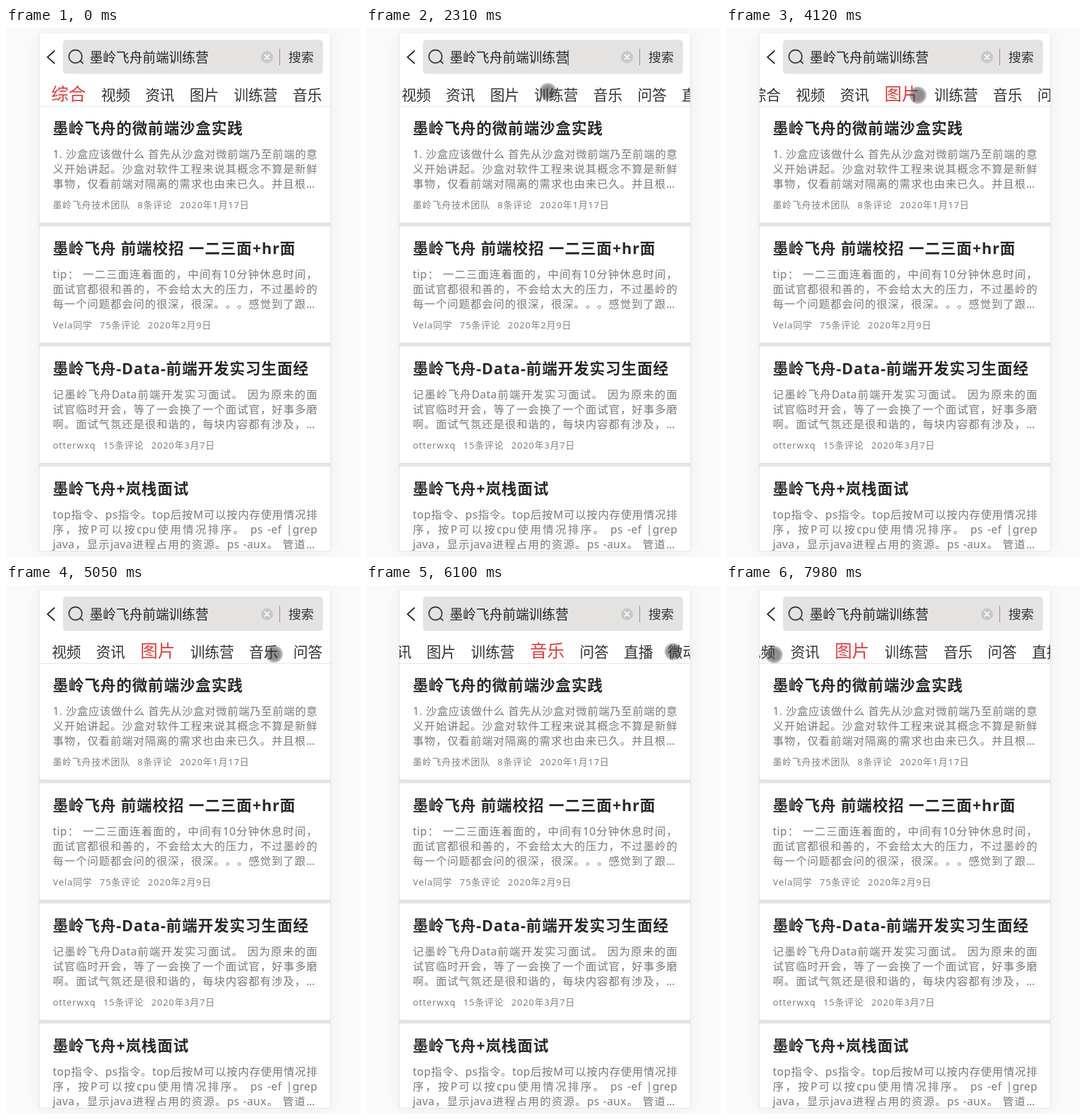
An HTML page that plays this animation: 571 by 854 pixels, repeating every 8 s.

```html
<!DOCTYPE html>
<html lang="zh-CN">
<head>
<meta charset="utf-8">
<style>
  html, body { margin: 0; width: 100%; height: 100%; overflow: hidden; background: #fafafa; }
  body { position: relative; font-family: "Noto Sans", "Noto Sans CJK SC", sans-serif; text-spacing-trim: space-all; }
  .phone { position: absolute; left: 53px; top: 9px; width: 469px; height: 835px; overflow: hidden;
    background: #fff; border: 1px solid #e2e2e2; border-top: 0; box-shadow: 0 0 22px rgba(0, 0, 0, .06); }
  svg { position: absolute; left: -54px; top: -9px; fill: none; stroke-linecap: round; }
  .text { position: absolute; line-height: 24px; white-space: nowrap; }
  .search { top: 26px; font-weight: 350; }
  .tabs { position: absolute; top: 78px; width: 100%; height: 39px; overflow: hidden; border-bottom: 1px solid #e2e2e2; }
  .strip { position: absolute; left: 19px; display: flex; gap: 24.4px; }
  .strip span { position: relative; line-height: 42px; font-size: 23.5px; font-weight: 350; color: #333; white-space: nowrap; }
  .strip .active { font-size: 28px; color: #e33e3c; top: -2px; }
  .feed { position: absolute; top: 117px; width: 100%; }
  .article { position: relative; height: 188px; border-bottom: 6px solid #e4e4e4; }
  .article .text { left: 21.5px; }
  .title { top: 24px; font-size: 24.6px; font-weight: 700; letter-spacing: 1px; color: #2a2a2e; }
  .body { width: 427px; font-size: 17.5px; letter-spacing: .5px; color: #7a7a7a; text-align: justify; text-align-last: justify; }
  .body.cut { width: 423px; }
  .meta { top: 147px; display: flex; gap: 12px; font-size: 14.6px; letter-spacing: 1px; color: #808080; }
  .pointer { position: absolute; left: -14.5px; top: -14.5px; width: 29px; height: 29px; border-radius: 50%;
    background: radial-gradient(closest-side, rgba(50, 50, 50, .55) 60%, rgba(80, 80, 80, .42) 85%, rgba(110, 110, 110, .3) 95%, transparent); }
</style>
</head>
<body>
<div class="phone">
  <svg width="571" height="130">
    <rect x="92" y="19" width="419" height="55" rx="5" fill="#e4e3e2"/>
    <path d="M78 37 67 47 78 57" stroke="#222" stroke-width="2"/>
    <circle cx="112" cy="46" r="10.5" stroke="#333" stroke-width="1.8"/>
    <path d="M120 53.5 124 57" stroke="#333" stroke-width="1.8"/>
    <circle cx="421" cy="47" r="9.7" fill="#c8c8c8"/>
    <path d="M417.5 43.5l7 7m0-7l-7 7" stroke="#fff" stroke-width="2"/>
    <path d="M441.5 34V60" stroke="#858585"/>
    <path id="caret" d="M326 36V60" stroke="#222" stroke-width="1.2"/>
  </svg>
  <div class="text search" style="left:81px;font-size:21.3px;color:#222">墨岭飞舟前端训练营</div>
  <div class="text search" style="left:401.5px;font-size:20.5px;color:#333">搜索</div>
  <div class="tabs"><div class="strip" id="strip"></div></div>
  <div class="feed" id="feed"></div>
</div>
<div class="pointer" id="pointer"></div>
<script>
const LOOP = 8000;
const SETTLE = 280; // time constant of the scroll after a tap
const tabNames = ['综合', '视频', '资讯', '图片', '训练营', '音乐', '问答', '直播', '微动态'];
const articles = [
  { title: '墨岭飞舟的微前端沙盒实践',
    lines: ['1. 沙盒应该做什么 首先从沙盒对微前端乃至前端的意', '义开始讲起。沙盒对软件工程来说其概念不算是新鲜', '事物,仅看前端对隔离的需求也由来已久。并且根…'],
    meta: ['墨岭飞舟技术团队', '8条评论', '2020年1月17日'] },
  { title: '墨岭飞舟 前端校招 一二三面+hr面',
    lines: ['tip: 一二三面连着面的,中间有10分钟休息时间,', '面试官都很和善的,不会给太大的压力,不过墨岭的', '每一个问题都会问的很深,很深。。。感觉到了跟…'],
    meta: ['Vela同学', '75条评论', '2020年2月9日'] },
  { title: '墨岭飞舟-Data-前端开发实习生面经',
    lines: ['记墨岭飞舟Data前端开发实习面试。 因为原来的面', '试官临时开会,等了一会换了一个面试官,好事多磨', '啊。面试气氛还是很和谐的,每块内容都有涉及,…'],
    meta: ['otterwxq', '15条评论', '2020年3月7日'] },
  { title: '墨岭飞舟+岚栈面试',
    lines: ['top指令、ps指令。top后按M可以按内存使用情况排', '序,按P可以按cpu使用情况排序。 ps -ef |grep', 'java,显示java进程占用的资源。ps -aux。 管道…'],
    meta: [] },
];

const move = (from, until, x, y) => ({ from, until, x, y });
const drag = (from, until, x, y) => ({ from, until, x, y, drags: true });
const tap = (from, tab) => ({ from, tab });
const gestures = [
  move(160, 580, 380, 125), move(580, 790, 382, 100), move(980, 1150, 389, 108),
  drag(1340, 1900, 269, 101), drag(2100, 2820, 351, 105),
  move(2990, 3740, 309, 108), tap(3900, 3),
  move(4120, 4400, 494, 112), drag(4400, 4610, 452, 111),
  move(4610, 4750, 432, 111), tap(5080, 5), move(5150, 5820, 495, 107),
  drag(6360, 6600, 465, 108), move(6600, 7130, 102, 117), move(7130, 7470, 77, 112), tap(7750, 3),
];

const byId = id => document.getElementById(id);
const fullWidth = s => s.replace(/,/g, '\uff0c').replace(/:/g, '\uff1a');
const smooth = p => p * p * (3 - 2 * p);

byId('strip').innerHTML = tabNames.map(name => `<span>${name}</span>`).join('');
const tabs = [...byId('strip').children];

byId('feed').innerHTML = articles.map(({ title, lines, meta }) => `
  <div class="article">
    <div class="text title">${title}</div>
    ${lines.map((line, n) => `<div class="text body${n === 2 ? ' cut' : ''}" style="top:${65 + n * 24}px">${fullWidth(line)}</div>`).join('')}
    <div class="text meta">${meta.map(m => `<span>${m}</span>`).join('')}</div>
  </div>`).join('');

function setActive(index) {
  tabs.forEach((tab, i) => tab.classList.toggle('active', i === index));
}

// Scroll offset that centres each tab once it is active
const centred = tabs.map((tab, i) => {
  setActive(i);
  const { offsetLeft, clientWidth } = byId('strip').parentNode;
  return offsetLeft + clientWidth / 2 - byId('strip').offsetLeft - tab.offsetLeft - tab.offsetWidth / 2;
});

function stateAt(t) {
  const state = { x: 505, y: -16, scroll: 0, active: 0 };
  let goal = 0, clock = 0;
  const settle = time => {
    state.scroll = goal + (state.scroll - goal) * Math.exp((clock - time) / SETTLE);
    clock = time;
  };
  for (const g of gestures) {
    if (t < g.from) break;
    if (g.tab !== undefined) {
      settle(g.from);
      state.active = g.tab;
      goal = centred[g.tab];
      continue;
    }
    const p = Math.min(1, (t - g.from) / (g.until - g.from));
    const eased = g.drags ? p : smooth(p);
    const dx = (g.x - state.x) * eased;
    if (g.drags) {
      settle(g.from);
      state.scroll += dx;
      goal = state.scroll;
    }
    state.x += dx;
    state.y += (g.y - state.y) * eased;
  }
  settle(t);
  return state;
}

function draw(t) {
  const { x, y, scroll, active } = stateAt(t);
  byId('pointer').style.transform = `translate(${x}px, ${y}px)`;
  byId('strip').style.transform = `translateX(${scroll}px)`;
  setActive(active);
  const caretOn = t >= 1310 && t < 3840 && (t - 1310) % 1000 < 500;
  byId('caret').style.visibility = caretOn ? 'visible' : 'hidden';
}

const start = performance.now();
function tick() {
  draw((performance.now() - start) % LOOP);
  requestAnimationFrame(tick);
}
tick();
</script>
</body>
</html>
```
